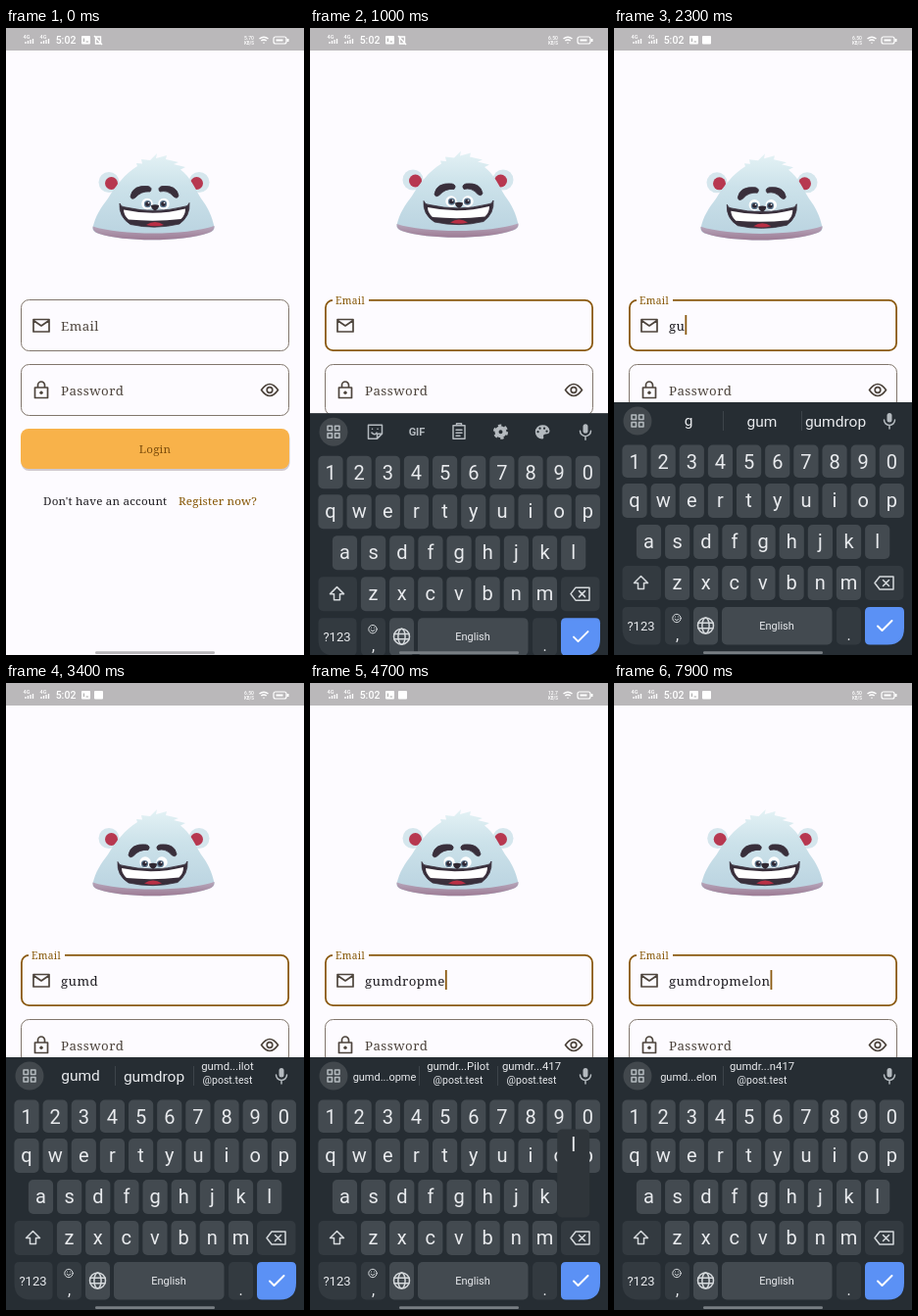
An HTML page that plays this animation: 304x640 px, repeating every 8000 ms.

```html
<!DOCTYPE html>
<html lang="en">
<head>
<meta charset="utf-8">
<title>Login form</title>
<style>
html, body { margin: 0; width: 100%; height: 100%; overflow: hidden; background: #fdfbff; }
svg { display: block; width: 100vw; height: 100vh; }
text { white-space: pre; }
.form { font-family: "Roboto Slab", "Noto Serif", serif; font-size: 13.3px; letter-spacing: .42px; fill: #4d443c; }
.form .small { font-size: 11.6px; letter-spacing: .2px; }
.ui { font-family: Roboto, Inter, sans-serif; fill: #e8eaed; text-anchor: middle; }
.line { fill: none; stroke: #4d443c; stroke-width: 1.7; stroke-linejoin: round; stroke-linecap: round; }
.tool { fill: none; stroke: #b4babf; stroke-width: 1.5; stroke-linejoin: round; stroke-linecap: round; }
</style>
</head>
<body>
<svg viewBox="0 0 304 640">
  <defs>
    <linearGradient id="fur" gradientUnits="userSpaceOnUse" x1="0" y1="128" x2="0" y2="212">
      <stop offset="0" stop-color="#e4f2f5"/><stop offset=".4" stop-color="#cce2ea"/>
      <stop offset="1" stop-color="#bad3e0"/>
    </linearGradient>
    <linearGradient id="chin" gradientUnits="userSpaceOnUse" x1="0" y1="203" x2="0" y2="217">
      <stop offset="0" stop-color="#b5a3b8"/><stop offset="1" stop-color="#9c7a93"/>
    </linearGradient>
  </defs>
  <rect width="304" height="640" fill="#fdfbff"/>

  <g id="status">
    <rect width="304" height="23" fill="#bab8ba"/>
    <g class="ui" style="fill:#fff;font-weight:500">
      <text x="21" y="11" font-size="5.5">4G</text><text x="38" y="11" font-size="5.5">4G</text>
      <text x="61" y="16" font-size="10.5">5:02</text>
      <text id="speed" x="248" y="11.5" font-size="5"></text><text x="248" y="16.5" font-size="4.5">KB/S</text>
    </g>
    <path d="M20 16v-2M22.5 16v-3M25 16v-4M27.5 16v-5M36 16v-2M38.5 16v-3M41 16v-4M43.5 16v-5" stroke="#fff" stroke-width="1.3"/>
    <rect x="77" y="8" width="9" height="8.5" rx="1" fill="#fff"/><path d="M79.5 14v-3.5M81.5 14h2.5" stroke="#aaa"/>
    <path id="vibrate" d="M91.5 9h5v7h-5zM90 8l8 9" fill="none" stroke="#fff" stroke-width="1.4"/>
    <rect id="note" x="90" y="8" width="9" height="8.5" rx="1" fill="#fff"/>
    <path d="M258.5 11Q263 7.5 267.5 11M260.3 13Q263 11 265.7 13M262.5 15.3h1" fill="none" stroke="#fff" stroke-width="1.5"/>
    <rect x="273" y="9" width="13" height="7" rx="2" fill="none" stroke="#fff" stroke-width="1.2"/>
    <path d="M275.5 12.5h7M287.5 11v3" stroke="#fff" stroke-width="2"/>
  </g>

  <g id="head">
    <g fill="#d5e6ed"><circle cx="105" cy="157.5" r="10.5"/><circle cx="197" cy="157.5" r="10.5"/></g>
    <g fill="#b73850"><circle cx="107.5" cy="158.5" r="6.5"/><circle cx="194.5" cy="158.5" r="6.5"/></g>
    <path fill="url(#fur)" d="M88.500 204C91 192 97 183 104 174C111 162 122 148 134 141L133 138L139 138.500L138 134L147 135L154 128L153 133L164 130L163 134L176 137L171 139L183 142L178 144.500C188 152 193 164 199 174C206 183 210 192 212.500 203Q213 207 207 209C180 218.500 121 218.500 95 210Q88 208 88.500 204Z"/>
    <path fill="url(#chin)" d="M88.500 202.500C118 212 184 212 212.500 202Q213 207 207 209C180 218.500 121 218.500 95 210Q88 208 88.500 202.500Z"/>
    <g id="face">
      <g fill="#392f3b" stroke="#392f3b" stroke-width=".8" stroke-linejoin="round">
        <path d="M127 172Q129 160 145 161.500Q150 163 147 167Q138 166 132 173Q128 176 127 172Z"/>
        <path d="M176 171Q174 160 159 161.500Q154 163 157 167Q165 165 171 172Q175 175 176 171Z"/>
        <path d="M116 179Q117 183 122 183Q152 190 181 182.500Q186 182.500 187 178.500Q188 192 177 200Q152 206 127 200.500Q115 193 116 179Z"/>
      </g>
      <path d="M120 185.500Q152 192.500 183 184.500Q183 191 178.500 195Q152 198 125 195.500Q120 191 120 185.500Z" fill="#fff"/>
      <path d="M143 201Q152 195 161 201Q152 203.500 143 201Z" fill="#b92f45"/>
      <g fill="#fff"><circle cx="144" cy="179.500" r="5.7"/><circle cx="161" cy="179.500" r="5.7"/></g>
      <g id="pupils">
        <g fill="#607b92"><circle cx="144.500" cy="179.700" r="3.6"/><circle cx="160.500" cy="179.700" r="3.6"/></g>
        <g fill="#2c2633"><circle cx="144.500" cy="179.700" r="2.4"/><circle cx="160.500" cy="179.700" r="2.4"/></g>
        <g fill="#fff"><circle cx="145.500" cy="178.500" r=".8"/><circle cx="161.500" cy="178.500" r=".8"/></g>
      </g>
      <path d="M148 181Q152 179.500 156 181Q156 184.500 152 186.500Q148 184.500 148 181Z" fill="#302832"/>
    </g>
  </g>

  <g class="form">
    <rect id="border" fill="none"/>
    <rect id="notch" x="23" y="275" width="37" height="5" fill="#fdfbff"/>
    <path class="line" d="M28 297.500h16v12.500h-16zM28 298.500l8 5.500l8-5.500"/>
    <text id="label">Email</text>
    <text id="typed" x="56" y="308.500" style="fill:#1d1b20"></text>
    <rect id="caret" y="293" width="1.800" height="20" fill="#8b5a10"/>

    <rect x="15.500" y="343.500" width="273" height="52" rx="8" fill="none" stroke="#81766c"/>
    <path class="line" d="M29.500 367h13v10.500h-13zM32.500 367v-2.500a3.500 3.500 0 0 1 7 0v2.500"/><circle cx="36" cy="372.300" r="1.700"/>
    <text x="56" y="374.500">Password</text>
    <path class="line" d="M260.500 369.500Q269 357.500 277.500 369.500Q269 381.500 260.500 369.500Z"/><circle class="line" cx="269" cy="369.500" r="2.800"/>

    <rect x="15.500" y="411" width="274" height="41" rx="8" fill="#cfcad2"/>
    <rect x="15" y="409" width="274" height="41" rx="8" fill="#f8b24a"/>
    <text class="small" x="152" y="434" text-anchor="middle" style="fill:#7c4d0c">Login</text>
    <text class="small" x="38" y="487" style="fill:#1d1b20">Don't have an account</text>
    <text class="small" x="176" y="487" style="fill:#845400">Register now?</text>
  </g>

  <g id="keyboard">
    <rect y="382" width="304" height="262" fill="#262d33"/>
    <circle cx="24" cy="401" r="14.500" fill="#42484d"/>
    <path class="tool" d="M18 395h4.500v4.500H18zM25.500 395H30v4.500h-4.500zM18 402.500h4.500v4.500H18zM25.500 402.500H30v4.500h-4.500z"/>
    <rect x="278.500" y="393" width="5" height="9.500" rx="2.500" fill="#b4babf"/><path class="tool" d="M275.500 400a5.500 5.500 0 0 0 11 0M281 405.500v3.500"/>
    <g id="tools">
      <path class="tool" d="M59.500 394h14v9l-5 5h-9zM68.500 408v-5h5M63 402q3 3 5 0M63.500 398h.1M69 398h.1"/>
      <text class="ui" x="109" y="405" font-size="11" font-weight="700" style="fill:#b4babf">GIF</text>
      <path class="tool" d="M146 394.500h12v13.500h-12zM149.500 394v-1.500h5v1.500M149 399h6M149 402h6M149 405h4"/>
      <circle cx="194.500" cy="401" r="4" fill="none" stroke="#b4babf" stroke-width="4"/>
      <circle cx="194.500" cy="401" r="6.500" fill="none" stroke="#b4babf" stroke-width="2.200" stroke-dasharray="3.400 3.407"/>
      <path d="M237 394a7.200 7.200 0 1 0 0 14.400q2-.4 1-3q0-2 2.500-2q4 0 4-3.500q-1-6-7.500-5.900z" fill="#b4babf"/>
      <path d="M232.500 401h.1M234.500 397.500h.1M239 397.500h.1M241.500 400.500h.1" stroke="#262d33" stroke-width="2.200" stroke-linecap="round"/>
    </g>
    <g id="suggestions" class="ui">
      <path d="M111.500 391v20" stroke="#3d444a"/><path id="divider" d="M191.500 391v20" stroke="#3d444a"/>
      <text id="word0" x="76"></text>
      <text id="word1" x="151"></text><text id="sub1" x="151" y="409" font-size="10.500"></text>
      <text id="word2" x="226"></text><text id="sub2" x="226" y="409" font-size="10.500"></text>
    </g>
    <g id="keys" class="ui"></g>
    <g id="popup" class="ui"><rect x="-16.500" y="-69" width="33" height="90" rx="5" fill="#2f353a"/><text id="popupText" y="-47" font-size="21"></text></g>
  </g>
  <rect id="pill" x="91" y="636.300" width="122" height="2.700" rx="1.300"/>
</svg>
<script>
const LOOP = 8000;
const FOCUS_AT = 450;
const NAME = "gumdropmelon";
const PRESSED_AT = [1900, 2100, 2400, 2600, 3500, 3700, 3900, 4200, 4500, 4700, 6200, 6800];
const TYPED_AT = [2000, 2200, 2500, 2900, 3600, 3800, 4000, 4300, 4550, 4750, 6300, 6900];
const SUGGEST_DELAY = 150;
const DOMAIN = "@post.test";
const $ = id => document.getElementById(id);
const progress = (t, from, to) => Math.min(1, Math.max(0, (t - from) / (to - from)));
const smooth = p => p * p * (3 - 2 * p);
const show = (id, on) => $(id).setAttribute("display", on ? "inline" : "none");
const move = (id, x, y) => $(id).setAttribute("transform", `translate(${x} ${y})`);
const set = (id, attrs) => { for (const k in attrs) $(id).setAttribute(k, attrs[k]); };

const keyCentre = {};
function buildKeys() {
  let out = "";
  const light = "#434a50", dim = "#333a40";
  const key = (x, y, w, h, fill = light) =>
    out += `<rect x="${x}" y="${y}" width="${w}" height="${h}" rx="5" fill="${fill}"/>`;
  const text = (x, y, size, s) => out += `<text x="${x}" y="${y}" font-size="${size}">${s}</text>`;
  const rows = [["1234567890", 21, 425.5], ["qwertyuiop", 21, 465], ["asdfghjkl", 35.5, 507], ["zxcvbnm", 64.5, 549]];
  rows.forEach(([chars, x0, y], row) => {
    const h = row ? 35 : 33.5;
    [...chars].forEach((c, i) => {
      const x = x0 + i * 29.15;
      key(x - 12.6, y, 25.2, h);
      text(x, y + h / 2 + (row ? 6 : 7.3), 20, c);
      keyCentre[c] = [x, y + h / 2];
    });
  });
  key(8.5, 549, 39.5, 35, dim);
  key(256, 549, 39.5, 35, dim);
  out += `<path d="M13.500 591h29q5 0 5 5v28.500q0 5-5 5h-17q-17 0-17-17v-16.500q0-5 5-5z" fill="${dim}"/>`;
  key(52, 591, 25, 38.5, dim);
  key(81, 591, 25, 38.5);
  key(110, 591, 112.5, 38.5);
  key(227, 591, 25, 38.5, dim);
  out += `<path d="M261 591h30q5 0 5 5v16.500q0 17-17 17h-18q-5 0-5-5v-28.500q0-5 5-5z" fill="#5b91f5"/>`;
  text(27.5, 615, 13, "?123");
  text(64.5, 625, 16, ",");
  text(166, 614, 11, "English");
  text(239.5, 625, 16, ".");
  out += `<g class="tool" style="stroke:#d5d9dc">
    <path d="M27.500 559.500l7 7h-4v6h-6v-6h-4z"/>
    <path d="M266 566.500l5-6.500h14v13h-14zM274.500 563.500l6 6m0-6l-6 6"/>
    <circle cx="64" cy="602.500" r="4.200" stroke-width="1"/>
    <path d="M62 603.500q2 2.500 4 0M62.500 601h.1M65.500 601h.1" stroke-width="1"/>
    <circle cx="93.500" cy="610" r="8"/><ellipse cx="93.500" cy="610" rx="3.600" ry="8"/><path d="M86 607.300h15M86 612.700h15"/>
    <path d="M269 610.500l4.500 4.500l10-10" style="stroke:#fff;stroke-width:2"/></g>`;
  $("keys").innerHTML = out;
}

const countAt = t => TYPED_AT.filter(at => at <= t).length;

function suggestionsFor(n) {
  const word = NAME.slice(0, n);
  const first = n > 7 ? `${word.slice(0, 4)}...${word.slice(-4)}` : word;
  if (n < 4) return [first, ["gum"], ["gumdrop"]];
  if (n < 8) return [first, ["gumdrop"], ["gumd...ilot", DOMAIN]];
  if (n < 11) return [first, ["gumdr...Pilot", DOMAIN], ["gumdr...417", DOMAIN]];
  return [first, ["gumdr...n417", DOMAIN], [""]];
}

function drawSuggestions(t) {
  const n = countAt(t - SUGGEST_DELAY);
  show("tools", !n);
  show("suggestions", n);
  if (!n) return;
  const [first, ...rest] = suggestionsFor(n);
  $("word0").textContent = first;
  set("word0", { y: 406, "font-size": n > 7 ? 11 : 15.5 });
  rest.forEach(([top, sub = ""], i) => {
    const word = "word" + (i + 1);
    $(word).textContent = top;
    $("sub" + (i + 1)).textContent = sub;
    set(word, { y: sub ? 394.5 : 406.5, "font-size": sub ? 11.3 : 15.5 });
  });
  show("divider", rest[1][0]);
}

function drawField(t) {
  const focus = smooth(progress(t, FOCUS_AT, FOCUS_AT + 170)), n = countAt(t);
  const weight = 1 + focus * .8, inset = weight / 2;
  set("border", {
    x: 15 + inset, y: 277 + inset, width: 274 - weight, height: 53 - weight, rx: 8.5 - inset,
    stroke: focus > 0 ? "#8b5a10" : "#81766c", "stroke-width": weight
  });
  show("notch", focus > .6);
  $("label").setAttribute("transform", `translate(${56 - 30 * focus} ${308.5 - 26.5 * focus}) scale(${1 - .23 * focus})`);
  $("label").style.fill = focus > .5 ? "#845400" : "#4d443c";
  $("typed").textContent = NAME.slice(0, n);
  const start = n ? TYPED_AT[n - 1] : FOCUS_AT;
  show("caret", t >= start && Math.floor((t - start) / 500) % 2 === 0);
  set("caret", { x: 56 + (n ? $("typed").getComputedTextLength() : 0) });
}

function drawBear(t) {
  const look = smooth(progress(t, 1900, 2900));
  const turn = smooth(progress(t, 6500, 7900));
  const bounce = Math.sin(Math.PI * progress(t, 400, 1600)) ** 2;
  move("head", turn * .7, look - 2.5 * bounce);
  move("face", look * (-2 + 3.5 * turn), look * 2.5);
  move("pupils", look * (-1 + 1.5 * turn), look * 1.3);
}

function drawKeyboard(t) {
  const hidden = (1 - progress(t, 750, 1100)) ** 2.5;
  move("keyboard", 0, 262 * hidden);
  const i = PRESSED_AT.findIndex(at => t >= at && t < at + 80);
  show("popup", i >= 0);
  if (i >= 0) {
    move("popup", ...keyCentre[NAME[i]]);
    $("popupText").textContent = NAME[i];
  }
  drawSuggestions(t);
  set("pill", { fill: hidden > .9 ? "#b7b5b8" : "#787e83" });
}

function draw(t) {
  $("speed").textContent = t < 800 ? "5.70" : t >= 3500 && t < 7000 ? "12.7" : "6.50";
  show("vibrate", t < 1300);
  show("note", t >= 1300);
  drawField(t);
  drawBear(t);
  drawKeyboard(t);
}

buildKeys();
const began = performance.now();
function tick() {
  draw((performance.now() - began) % LOOP);
  requestAnimationFrame(tick);
}
tick();
</script>
</body>
</html>
```
